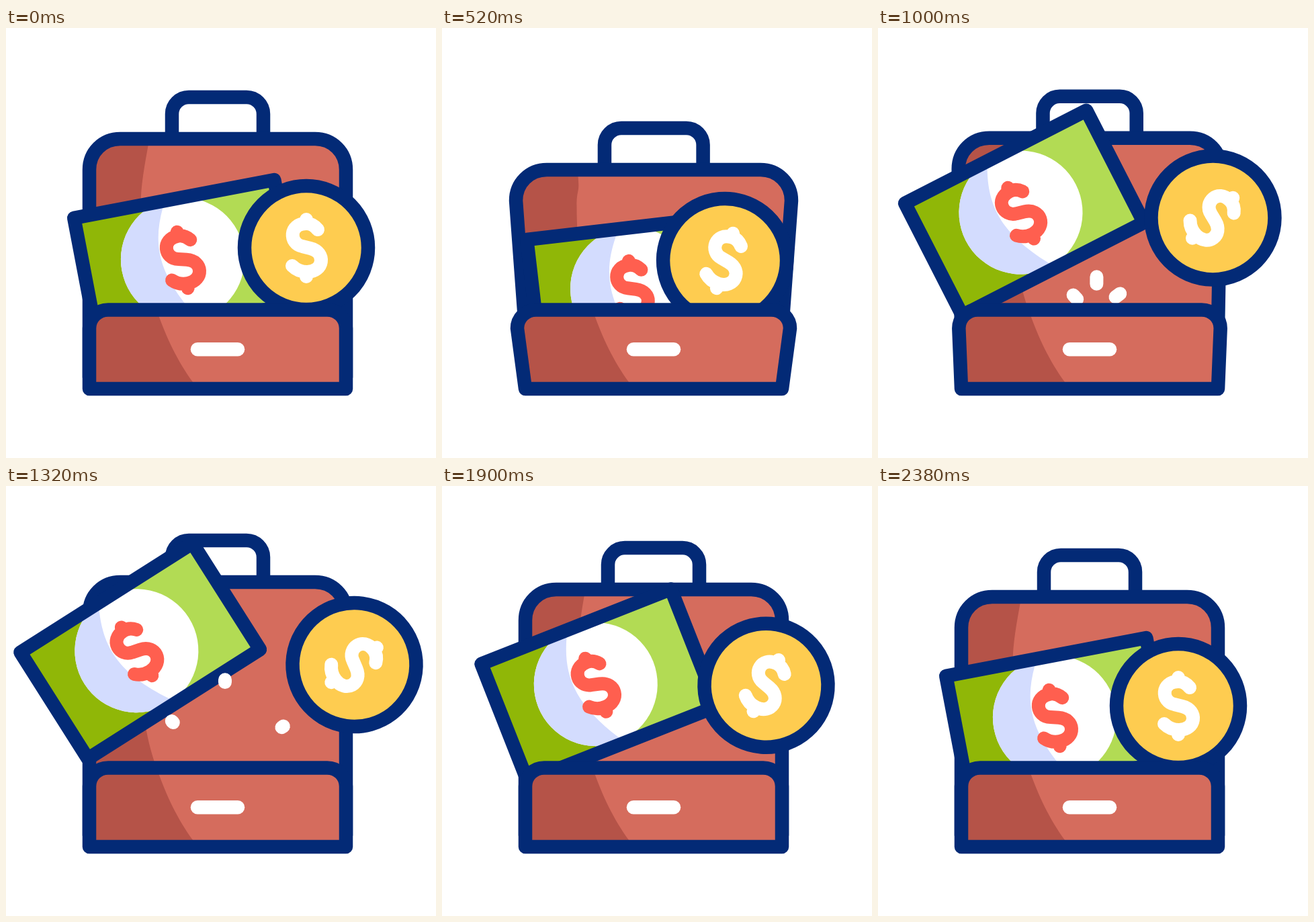
Recreate the animation shown at these times as an HTML page with a canvas. Size 640 by 640 pixels, loop 2.4 s.

```html
<!DOCTYPE html>
<html lang="en">
<head>
<meta charset="utf-8">
<title>Briefcase with money</title>
<style>
html, body { margin: 0; width: 100%; height: 100%; overflow: hidden; background: #fff; }
canvas { display: block; width: 640px; height: 640px; }
</style>
</head>
<body>
<canvas width="640" height="640"></canvas>
<script>
const ctx = document.querySelector('canvas').getContext('2d');
const LOOP = 2400;
const NAVY = '#032a76', RED = '#d56c5d', DARK_RED = '#b55348', GOLD = '#fecc50',
      GREEN = '#b2db54', DARK_GREEN = '#90b707', LILAC = '#d3dcfe', CORAL = '#ff5f4f';

const clamp = x => Math.min(1, Math.max(0, x));
const span = (t, from, to) => clamp((t - from) / (to - from));
const sine = x => (1 - Math.cos(Math.PI * x)) / 2;
const easeOut = x => 1 - (1 - x) ** 2;
const power = n => x => x < .5 ? (2 * x) ** n / 2 : 1 - (2 - 2 * x) ** n / 2;
const steep = power(3.5), cubic = power(3);
const mix = (a, b, k) => a.map((v, i) => v + (b[i] - v) * k);

// Poses at rest, crouched and jumped out
const BILL = [[267.8, 346.5, -10.8], [287.8, 390.6, -6.6], [199.7, 245.4, -32.4]];  // x, y, degrees
const COIN = [[447, 327, 0], [421, 346, 16.5], [518.5, 266, 52.6]];
const CASE = [[0, 0], [46, 14], [-22, 0]];                                         // drop, bulge

function pose([rest, crouch, jump], t, rise) {
  const low = mix(rest, crouch, cubic(span(t, 0, 490)));
  return mix(mix(low, jump, rise), rest, steep(span(t, 1400, 2400)));
}

const DOLLAR = new Path2D('M17-27Q10-36 0-36C-26-36-26-6-6-2L6 1C30 7 26 36 1 36Q-12 36-21 27M0-42v.01M0 43v.01');

function fill(path, color) {
  ctx.fillStyle = color;
  ctx.fill(path);
}

function stroke(path, color, width = 20.5) {
  ctx.strokeStyle = color;
  ctx.lineWidth = width;
  ctx.stroke(path);
}

function disc(x, y, r) {
  const path = new Path2D();
  path.arc(x, y, r, 0, 2 * Math.PI);
  return path;
}

function at([x, y, degrees], draw) {
  ctx.save();
  ctx.translate(x, y);
  ctx.rotate(degrees * Math.PI / 180);
  draw();
  ctx.restore();
}

function clipped(path, draw) {
  ctx.save();
  ctx.clip(path);
  draw();
  ctx.restore();
}

function leather(path, shade) {
  fill(path, RED);
  clipped(path, () => fill(shade, DARK_RED));
  stroke(path, NAVY);
}

function drawBill() {
  const paper = new Path2D('M-151.7-93.7h303.4v187.4h-303.4z');
  const shade = new Path2D('M-19-84C-43-35-46 10-1 84L-1 110H-170V-110H-19z');
  fill(paper, GREEN);
  clipped(paper, () => {
    fill(shade, DARK_GREEN);
    const spot = disc(-4.4, -3, 92);
    fill(spot, '#fff');
    clipped(spot, () => fill(shade, LILAC));
  });
  ctx.translate(-4.8, -2.5);
  stroke(DOLLAR, CORAL, 20);
  ctx.translate(4.8, 2.5);
  stroke(paper, NAVY);
}

function drawCoin() {
  const rim = disc(0, 0, 92);
  fill(rim, GOLD);
  stroke(rim, NAVY);
  stroke(DOLLAR, '#fff', 20);
}

function drawSparks(t) {
  if (t < 880 || t > 1440) return;
  const head = easeOut(span(t, 880, 1400)), tail = easeOut(span(t, 900, 1440));
  const rays = [[325, 430, 326, 285], [322.5, 432, 245, 348], [322, 423, 415, 356]];
  for (const [x0, y0, x1, y1] of rays) {
    const path = new Path2D();
    path.moveTo(...mix([x0, y0], [x1, y1], head));
    path.lineTo(...mix([x0, y0], [x1, y1], tail));
    stroke(path, '#fff', 20);
  }
}

function draw(t) {
  const rise = steep(span(t, 450, 1350));
  const [drop, bulge] = pose(CASE, t, sine(span(t, 500, 1300)));
  const top = 165 + drop, left = 124 - bulge, right = 506 + bulge;

  ctx.fillStyle = '#fff';
  ctx.fillRect(0, 0, 640, 640);
  ctx.lineCap = ctx.lineJoin = 'round';

  const hl = 247 - bulge * .36, hr = 383 + bulge * .4;
  stroke(new Path2D(`M${hl} ${top}V${top - 37}a25 25 0 0 1 25-25H${hr - 25}a25 25 0 0 1 25 25V${top}`), NAVY);

  const back = new Path2D(`M124 447L${left} ${top + 46}Q${left} ${top} ${left + 46} ${top}` +
    `H${right - 46}Q${right} ${top} ${right} ${top + 46}L506 447V520H124z`);
  const rounded = new Path2D(`M124 447L${left} ${top + 46}C${left} ${top + 20} ${left + 20} ${top} ${left + 46} ${top}` +
    `H${right - 46}C${right - 20} ${top} ${right} ${top + 20} ${right} ${top + 46}L506 447V520H124z`);
  const shadeTop = 213.5 - Math.max(0, drop) * .26;
  leather(rounded, new Path2D(`M${shadeTop} ${top}C206 ${top + 40} 200.5 235 200.5 265` +
    'C200.5 325 208 380 228 430V530H80V100z'));

  at(pose(BILL, t, rise), drawBill);
  drawSparks(t);
  at(pose(COIN, t, rise), drawCoin);

  const wide = bulge * .86, pl = 124 - wide, pr = 506 + wide;
  const front = new Path2D(`M124 537L${pl} 447C${pl} 432 ${pl + 12} 419.5 ${pl + 28} 419.5` +
    `H${pr - 28}C${pr - 12} 419.5 ${pr} 432 ${pr} 447L506 537z`);
  leather(front, new Path2D('M224 419C239 462 255 495 278 527L286 540H90V419z'));
  stroke(new Path2D('M285 478.3H345'), '#fff', 20.5);
}

function frame(now) {
  draw(now % LOOP);
  requestAnimationFrame(frame);
}
requestAnimationFrame(frame);
</script>
</body>
</html>
```
